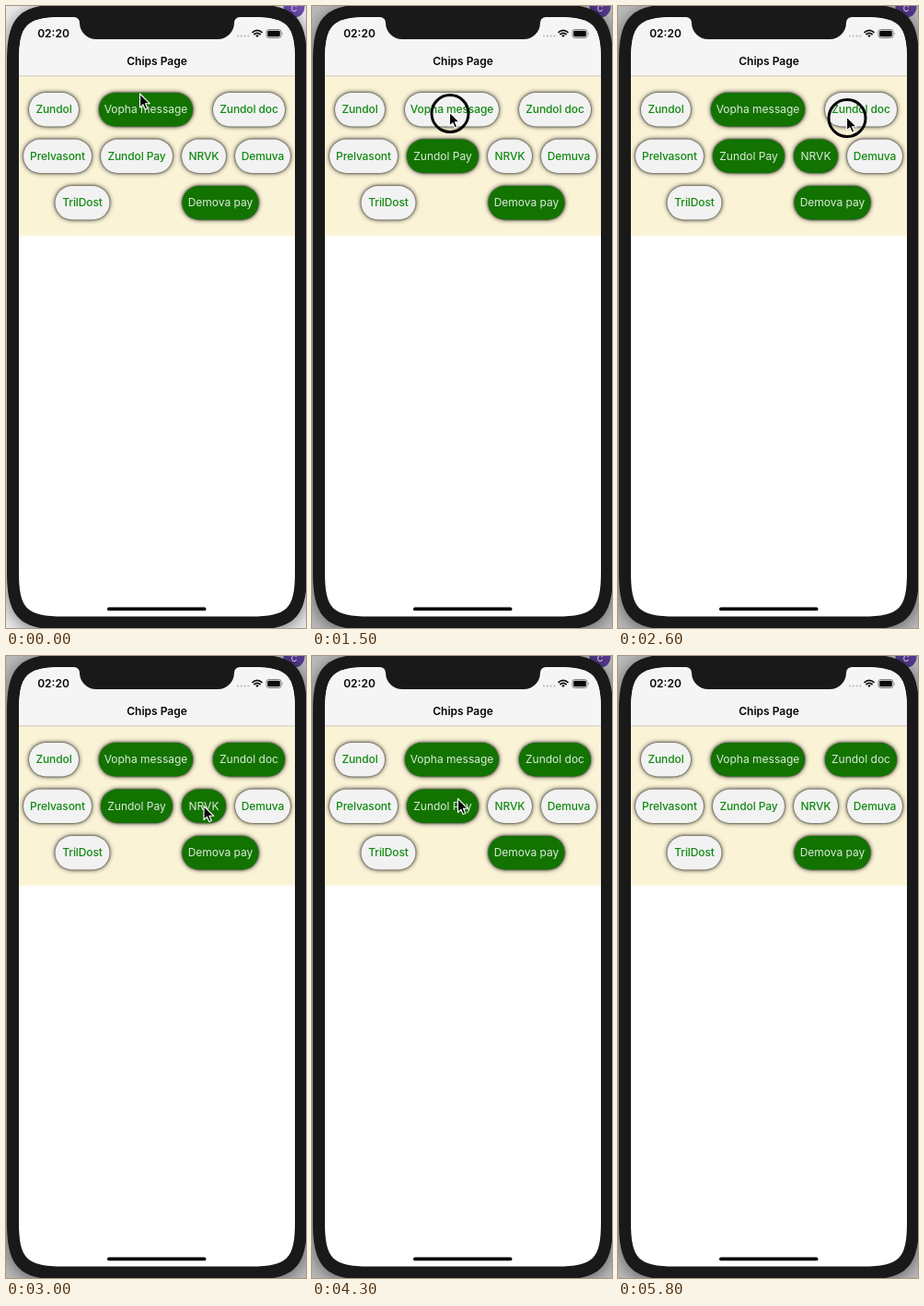
An HTML page for the animation above (5900 ms loop, 326 by 674 pixels).

```html
<!DOCTYPE html>
<html lang="en">
<head>
<meta charset="utf-8">
<title>Chips Page</title>
<style>
  html, body { margin: 0; width: 100%; height: 100%; overflow: hidden; background: #eee; }
  svg { display: block; width: 326px; height: 674px; }
  text { font-family: Inter, Roboto, sans-serif; font-size: 12px; text-anchor: middle; }
  .bold { font-weight: 600; fill: #050505; }
  .body { fill: #191919; filter: drop-shadow(0 3px 9px rgba(0, 0, 0, .5)); }
  .chip rect { fill: #f2f2f2; filter: drop-shadow(0 0 .8px rgba(0, 0, 0, .6)) drop-shadow(0 .5px 2.8px rgba(0, 0, 0, .75)); }
  .chip text { fill: #128a12; font-weight: 500; letter-spacing: -.1px; }
  .chip.on rect { fill: #127300; }
  .chip.on text { fill: #dcebd6; font-weight: 400; letter-spacing: 0; }
</style>
</head>
<body>
<svg viewBox="0 0 326 674">
  <defs>
    <clipPath id="screen"><path id="glass"/></clipPath>
    <linearGradient id="panel" x2="0" y2="1">
      <stop offset=".985" stop-color="#faf3d6"/>
      <stop offset="1" stop-color="#fdf9ea"/>
    </linearGradient>
  </defs>

  <rect id="desk" width="326" height="674"/>
  <circle id="avatar" cx="313" cy="1" r="11.5"/>
  <path id="body" class="body"/>
  <text x="313" y="6" fill="#e4def2" style="font-size:9px">C</text>

  <g clip-path="url(#screen)">
    <rect x="14" y="12" width="300" height="650" fill="#fff"/>
    <rect x="14" y="12" width="300" height="64" fill="#f6f5f6"/>
    <rect x="14" y="76" width="300" height="173.5" fill="url(#panel)"/>
    <rect x="14" y="75.3" width="300" height="1" fill="#cfcbbd"/>
    <g id="chips"></g>
  </g>

  <path d="M74 11V12A6 6 0 0 1 80 18A18 18 0 0 0 98 36H230A18 18 0 0 0 248 18A6 6 0 0 1 254 12V11Z" fill="#191919"/>
  <text class="bold" x="51.5" y="34">02:20</text>
  <text class="bold" x="164" y="64">Chips Page</text>
  <path d="M252 32.5H264" stroke="#b9b9b9" stroke-width="2.2" stroke-linecap="round" stroke-dasharray="0 3.8"/>
  <g fill="none" stroke="#0b0b0b" stroke-width="1.7">
    <path d="M267.5 28.8Q273 23.8 278.5 28.8M269.4 31Q273 27.8 276.6 31"/>
    <path d="M271.2 31.9Q273 30.4 274.8 31.9L273 34Z" fill="#0b0b0b" stroke="none"/>
  </g>
  <rect x="283" y="25.5" width="16" height="9" rx="2.4" fill="none" stroke="#777" stroke-width=".9"/>
  <rect x="284.2" y="26.7" width="13.6" height="6.6" rx="1.4" fill="#0b0b0b"/>
  <path d="M300.2 28.5q1.5 1.5 0 3Z" fill="#777"/>
  <rect x="110" y="651.5" width="107.5" height="3.8" rx="1.9" fill="#050505"/>

  <g id="pointer">
    <circle id="ring" cx=".5" cy="1.5" r="20" fill="none" stroke="#050505" stroke-width="3"/>
    <path d="M0 0V15L3.4 11.8L5.7 17L8.3 15.9L6 10.8H10.8Z" fill="#050505" stroke="#fff" stroke-width="1.1" stroke-linejoin="round"/>
  </g>
</svg>
<script>
const LOOP = 5900, STEP = 100, WAKE = 400, PRESS = 100, TRAVEL = 300;
const $ = id => document.getElementById(id);

// Rows of chips, each with its label and width
const rows = [
  [['Zundol', 54], ['Vopha message', 102], ['Zundol doc', 78]],
  [['Prelvasont', 74], ['Zundol Pay', 78], ['NRVK', 48], ['Demuva', 60]],
  [['TrilDost', 59], ['Demova pay', 83]]
];
const litAtStart = ['Vopha message', 'Demova pay'];

// Pointer stops: end of stay, chip, offset from its centre
const stops = [
  { end: 500, chip: 'Vopha message', dx: -6.5, dy: -17 },
  { end: 1100, chip: 'Zundol Pay', dx: -2, dy: 2 },
  { end: 1600, chip: 'Vopha message', dx: -2.5, dy: 3 },
  { end: 2100, chip: 'NRVK', dx: 0, dy: 0 },
  { end: 2700, chip: 'Zundol doc', dx: -15.5, dy: 8 },
  { end: 3200, chip: 'NRVK', dx: 0, dy: 0 },
  { end: 3800, chip: 'Zundol Pay', dx: 19.5, dy: 0, hover: true },
  { end: 4500, chip: 'Zundol Pay', dx: 16.5, dy: -8 }
];
const exit = { x: -14, y: 46 };

function add(parent, tag, attrs) {
  const el = document.createElementNS('http://www.w3.org/2000/svg', tag);
  for (const key in attrs) el.setAttribute(key, attrs[key]);
  return parent.appendChild(el);
}

// Rectangle with smooth corners that start e from the corner, with handles at c
function smoothRect(x, y, w, h, e, c) {
  return `M${x + e} ${y}h${w - 2 * e}c${e - c} 0 ${e} ${c} ${e} ${e}v${h - 2 * e}` +
    `c0 ${e - c} ${-c} ${e} ${-e} ${e}h${2 * e - w}c${c - e} 0 ${-e} ${-c} ${-e} ${-e}v${2 * e - h}` +
    `c0 ${c - e} ${c} ${-e} ${e} ${-e}Z`;
}
$('glass').setAttribute('d', smoothRect(14, 12, 300, 649.5, 48, 8.3));
$('body').setAttribute('d', smoothRect(1, -2, 326, 678, 62, 13.7));

// Spread each row with equal space around its chips
const chips = {};
rows.forEach((row, r) => {
  const total = row.reduce((sum, chip) => sum + chip[1], 0);
  const gap = (300 - total) / row.length / 2;
  const top = 94 + 50.5 * r;
  let x = 14;
  for (const [label, width] of row) {
    x += gap;
    const g = add($('chips'), 'g', { class: 'chip' });
    add(g, 'rect', { x, y: top, width, height: 36.5, rx: 18.25 });
    add(g, 'text', { x: x + width / 2, y: top + 22 }).textContent = label;
    chips[label] = { g, x: x + width / 2, y: top + 18 };
    x += width + gap;
  }
});

const tips = stops.map(s => ({ x: chips[s.chip].x + s.dx, y: chips[s.chip].y + s.dy })).concat(exit);

function pointerAt(t) {
  const i = stops.filter(s => s.end <= t).length;
  if (i === 0) return tips[0];
  const u = Math.min(1, (t - stops[i - 1].end) / TRAVEL), k = u * u * (3 - 2 * u);
  const a = tips[i - 1], b = tips[i];
  return { x: a.x + (b.x - a.x) * k, y: a.y + (b.y - a.y) * k };
}

function draw(t) {
  const clicks = stops.filter(s => !s.hover);
  for (const label in chips) {
    const flips = clicks.filter(s => s.chip === label && s.end <= t).length;
    chips[label].g.classList.toggle('on', litAtStart.includes(label) !== (flips % 2 === 1));
  }
  const { x, y } = pointerAt(t);
  $('pointer').setAttribute('transform', `translate(${x} ${y})`);
  const pressed = clicks.some(s => t >= s.end - PRESS && t < s.end);
  $('ring').style.display = pressed ? '' : 'none';
  $('desk').setAttribute('fill', t < WAKE ? '#eee' : '#bcbcbc');
  $('avatar').setAttribute('fill', t < WAKE ? '#6d4db0' : '#54398c');
}

const begin = performance.now();
function tick() {
  const t = (performance.now() - begin) % LOOP;
  draw(Math.floor(t / STEP) * STEP);
  requestAnimationFrame(tick);
}
tick();
</script>
</body>
</html>
```
